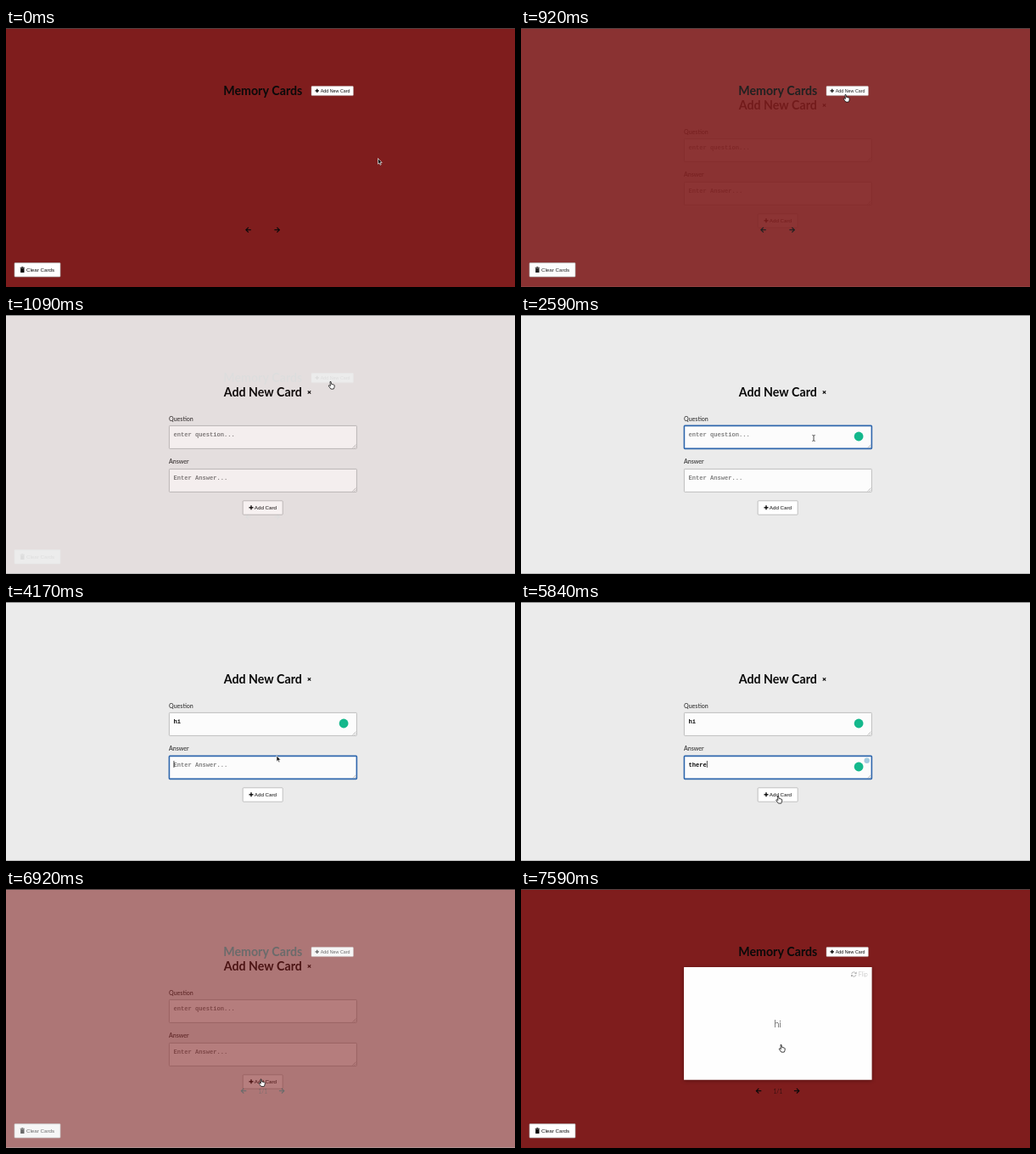
Write an HTML page with a canvas that moves like this. It is 600x305 px and loops after 8 s.

```html
<!DOCTYPE html>
<html lang="en">
<head>
<meta charset="utf-8">
<title>Memory Cards</title>
<style>
html, body { margin: 0; width: 100%; height: 100%; overflow: hidden; background: #7f1d1d; }
canvas { display: block; width: 100vw; height: 100vh; }
</style>
</head>
<body>
<canvas id="stage"></canvas>
<script>
const W = 600, H = 305, LOOP = 8000, FPS = 12;
const RED = '#7f1d1d', PANEL = '#ebebeb', INK = '#0a0a0a', GREEN = '#14b88c';
const LATO = 'Lato, sans-serif';
const SANS = '"Liberation Sans", Arial, sans-serif';
const MONO = '"Liberation Mono", "Courier New", monospace';
const CHAR = 7.1 * 0.6;
const dpr = window.devicePixelRatio || 1;

const screen = document.getElementById('stage');
const sheet = document.createElement('canvas');
const [page, form] = [screen, sheet].map(c => {
  c.width = W * dpr;
  c.height = H * dpr;
  const g = c.getContext('2d');
  g.scale(dpr, dpr);
  return g;
});

// Steps are twelfths of a second.
const FADE = { 11: 0.1, 12: 0.55, 13: 0.94, 82: 0.87, 83: 0.43, 84: 0.1 };
const QUESTION = { y: 130, hint: 'enter question...', text: 'hi', keys: [38, 41], focus: 22, blur: 50, icon: 27, badge: 39 };
const ANSWER = { y: 181, hint: 'Enter Answer...', text: 'there', keys: [62, 64, 66, 68, 70], focus: 50, blur: 80, icon: 55, badge: 67 };
const SUBMIT = 82, CARD = 85;

const PATH = [
  [3, 438.5, 153.5], [9, 382, 78.5], [14, 382, 78.5], [21, 346, 144], [32, 345, 145],
  [44, 345, 142], [48, 319, 181], [61, 319, 181], [70, 302.5, 228.5], [73, 305, 246],
  [75, 305, 245], [78, 301, 225], [83, 300, 224], [85, 300, 224], [89, 305, 191.5], [91, 306, 183.5]
];

function text(g, str, x, y, font, color, align = 'left') {
  g.font = font;
  g.fillStyle = color;
  g.textAlign = align;
  g.fillText(str, x, y);
}

function line(g, pts, color, width) {
  g.beginPath();
  pts.forEach(([x, y]) => g.lineTo(x, y));
  g.strokeStyle = color;
  g.lineWidth = width;
  g.stroke();
}

function dot(g, x, y, r, color) {
  g.beginPath();
  g.arc(x, y, r, 0, 7);
  g.fillStyle = color;
  g.fill();
}

function box(g, x, y, w, h, fill, stroke, width = 0.7, r = 0.8) {
  g.beginPath();
  g.roundRect(x, y, w, h, r);
  g.fillStyle = fill;
  g.fill();
  if (!stroke) return;
  g.strokeStyle = stroke;
  g.lineWidth = width;
  g.stroke();
}

function plus(g, x, y, r) {
  line(g, [[x - r, y], [x + r, y]], INK, 1.4);
  line(g, [[x, y - r], [x, y + r]], INK, 1.4);
}

function arrow(g, x, y, dir) {
  const tip = x + 2.9 * dir;
  line(g, [[x - 3 * dir, y], [tip, y]], INK, 1.2);
  line(g, [[x, y - 2.9], [tip, y], [x, y + 2.9]], INK, 1.2);
}

function trash(g, x, y) {
  g.fillStyle = INK;
  g.fillRect(x - 2.6, y - 2.8, 5.2, 0.9);
  g.fillRect(x - 0.9, y - 3.4, 1.8, 0.8);
  g.fillRect(x - 2.2, y - 1.5, 4.4, 4.9);
}

function syncIcon(g, x, y, color) {
  g.strokeStyle = g.fillStyle = color;
  g.lineWidth = 0.9;
  for (const a of [0, Math.PI]) {
    g.save();
    g.translate(x, y);
    g.rotate(a);
    g.beginPath();
    g.arc(0, 0, 2.7, Math.PI * 1.05, Math.PI * 1.8);
    g.stroke();
    g.beginPath();
    g.moveTo(3.3, -3.2);
    g.lineTo(3.3, -0.6);
    g.lineTo(0.7, -0.6);
    g.fill();
    g.restore();
  }
}

function drawPage(k) {
  const g = page, added = k >= SUBMIT, shown = k >= CARD;
  g.fillStyle = RED;
  g.fillRect(0, 0, W, H);
  text(g, 'Memory Cards', 302.8, 79.2, `700 14.2px ${LATO}`, INK, 'center');
  box(g, 360, 68.6, 49.4, 11, '#fff', '#b9b0b0', 0.5);
  plus(g, 366.7, 73.9, 2.2);
  text(g, 'Add New Card', 370.8, 75.9, `5.33px ${SANS}`, INK);

  if (shown) {
    g.save();
    g.shadowColor = 'rgba(0,0,0,0.3)';
    g.shadowBlur = 5 * dpr;
    g.shadowOffsetY = dpr;
    box(g, 192, 92, 221.6, 132.7, '#fefefe', null, 0, 0.5);
    g.restore();
    syncIcon(g, 392.3, 100.5, '#b0b0b0');
    text(g, 'Flip', 397.7, 103.1, `300 7.1px ${LATO}`, '#aaa');
    text(g, 'hi', 302.6, 162.5, `300 10.7px ${LATO}`, '#111', 'center');
  }

  const gap = added ? 22.3 : 16.8;
  arrow(g, 302.6 - gap, 237.7, -1);
  arrow(g, 302.6 + gap, 237.7, 1);
  if (added) text(g, '1/1', 302.8, 240.6, `300 7.1px ${LATO}`, INK, 'center');

  box(g, 10, 276.6, 54, 16.4, '#fff', '#aaa');
  trash(g, 19.3, 284.6);
  text(g, 'Clear Cards', 24, 286.9, `6.22px ${SANS}`, INK);
}

function drawField(k, f) {
  const g = form, y = f.y, x = 197.4, open = k < SUBMIT;
  const focused = k >= f.focus && k < f.blur;
  const typed = open ? f.keys.filter(n => n <= k).length : 0;
  box(g, 192.4, y + 0.4, 221, 27, '#fcfcfc', focused ? '#2f67ad' : '#a9a9a9', focused ? 1.6 : 0.7);
  for (const d of [1.8, 4]) line(g, [[412.6 - d, y + 26.6], [412.6, y + 26.6 - d]], '#888', 0.5);

  const str = typed ? f.text.slice(0, typed) : f.hint;
  text(g, str, x, y + 12.8, `700 7.1px ${MONO}`, typed ? INK : '#808080');

  const last = typed ? f.keys[typed - 1] : f.focus;
  if (focused && (k - last) % 12 < 6) {
    g.fillStyle = INK;
    g.fillRect(x + typed * CHAR + 0.2, y + 6, 0.7, 8);
  }
  if (open && k >= f.icon) dot(g, 398.1, y + 13, 5.4, GREEN);
  if (focused && k >= f.badge) dot(g, 407.7, y + 5.8, 3.2, '#a3cbe0');
}

function drawForm(k) {
  const g = form;
  g.fillStyle = PANEL;
  g.fillRect(0, 0, W, H);
  text(g, 'Add New Card', 302.8, 96.1, `700 14.2px ${LATO}`, INK, 'center');
  line(g, [[355.8, 89.3], [359.2, 92.7]], INK, 1.2);
  line(g, [[355.8, 92.7], [359.2, 89.3]], INK, 1.2);
  text(g, 'Question', 192, 124.6, `7.1px ${LATO}`, '#222');
  text(g, 'Answer', 192, 175.2, `7.1px ${LATO}`, '#222');
  drawField(k, QUESTION);
  drawField(k, ANSWER);
  box(g, 279.2, 218.8, 47, 16.4, '#fff', '#aaa');
  plus(g, 289, 226.8, 2.5);
  text(g, 'Add Card', 292.8, 229.1, `6.22px ${SANS}`, INK);
}

function cursorAt(k) {
  if (k <= PATH[0][0]) return PATH[0].slice(1);
  const i = PATH.findIndex(p => p[0] > k);
  if (i < 0) return PATH[PATH.length - 1].slice(1);
  const [k0, x0, y0] = PATH[i - 1], [k1, x1, y1] = PATH[i];
  const u = (k - k0) / (k1 - k0), s = u * u * (3 - 2 * u);
  return [x0 + (x1 - x0) * s, y0 + (y1 - y0) * s];
}

function shape(x, y, pts, fill, stroke, width) {
  const g = page;
  g.beginPath();
  pts.forEach(([a, b]) => g.lineTo(x + a, y + b));
  g.closePath();
  g.fillStyle = fill;
  g.fill();
  g.strokeStyle = stroke;
  g.lineWidth = width;
  g.stroke();
}

function drawCursor(k) {
  if ((k >= 38 && k < 44) || (k >= 62 && k < 70)) return;
  const [x, y] = cursorAt(k);
  const inField = k >= 14 && k < 62 && [QUESTION, ANSWER].some(f => y > f.y && y < f.y + 28);
  const onButton = (k < 15 && y < 80) || (k >= 70 && k < SUBMIT && y < 235) || k >= SUBMIT;
  if (inField) {
    line(page, [[x, y - 3], [x, y + 3]], '#222', 0.8);
    for (const d of [-1, 1])
      line(page, [[x - 1.7, y + 3.6 * d], [x, y + 2.9 * d], [x + 1.7, y + 3.6 * d]], '#222', 0.7);
  } else if (onButton) {
    shape(x, y, [[0, 0], [1, 0], [1.7, 3], [4.4, 3.5], [5.3, 4.5], [4.9, 7], [4.2, 8.6],
      [0.9, 8.6], [-0.8, 6.4], [-1.8, 4.7], [-0.9, 4.2], [0.4, 5.1]], '#fff', '#111', 0.8);
  } else {
    shape(x, y, [[0, 0], [0, 6.7], [1.5, 5.4], [2.6, 7.8], [3.7, 7.3], [2.7, 5], [4.7, 5]], '#111', '#eee', 0.7);
  }
}

function draw(k) {
  drawPage(k);
  const alpha = k in FADE ? FADE[k] : k > 13 && k < 82 ? 1 : 0;
  if (alpha) {
    drawForm(k);
    page.globalAlpha = alpha;
    page.drawImage(sheet, 0, 0, W, H);
    page.globalAlpha = 1;
  }
  page.fillStyle = alpha > 0.9 ? '#8c8c8c' : '#4e4040';
  page.fillRect(0, 0, W, 1);
  page.fillStyle = `rgba(185,185,185,${alpha})`;
  page.fillRect(0, H - 1, W, 1);
  drawCursor(k);
}

const start = performance.now();
function tick() {
  const t = (performance.now() - start) % LOOP;
  draw(Math.floor(t * FPS / 1000));
  requestAnimationFrame(tick);
}
tick();
</script>
</body>
</html>
```
